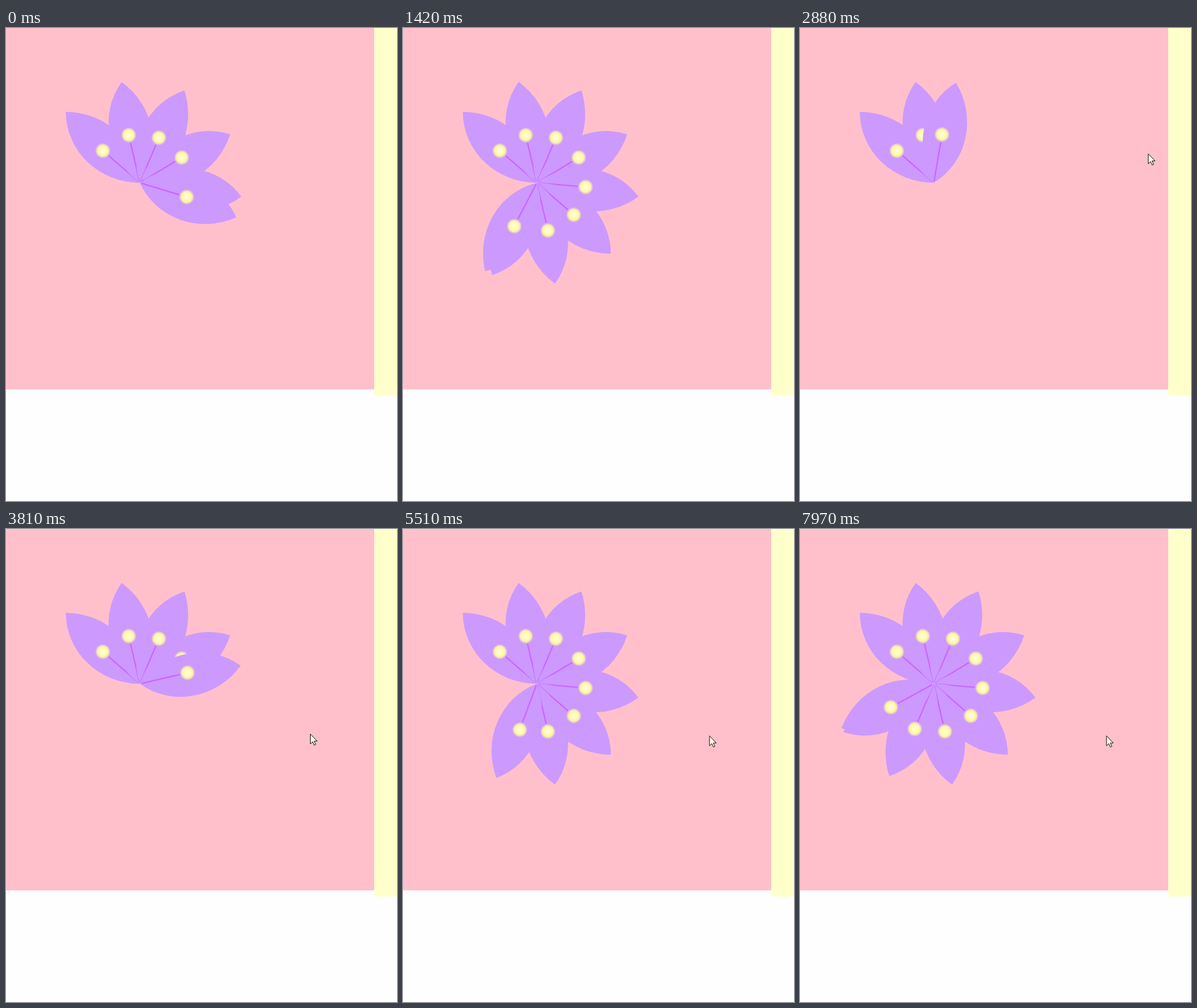
An HTML page with a canvas that plays this animation: 634x767 px, repeating every 8 s.

```html
<!DOCTYPE html>
<html lang="en">
<head>
<meta charset="utf-8">
<title>Blooming flower</title>
<style>
  html, body { margin: 0; width: 100%; height: 100%; overflow: hidden; background: #fefefe; }
  canvas { display: block; }
</style>
</head>
<body>
<canvas id="stage" width="634" height="767"></canvas>
<script>
const ctx = document.getElementById('stage').getContext('2d');
const LOOP = 8000, PETALS = 10, GAP = 36, FULL = GAP * (PETALS - 1);
const RESTART = 27, HOLD = 85;

// The picture advances in steps: [first step, last step, count]
const RUNS = [
  [70, 870, 11], [950, 1730, 11], [1800, 2570, 11], [2650, 3430, 11], [3500, 4270, 11],
  [4360, 5120, 11], [5190, 5960, 11], [6040, 6590, 8], [7590, 7970, 6]
];

// Pointer path: [step, x, y]
const POINTER = [
  [32, 392, 2], [33, 393, 18], [38, 607, 250], [42, 482, 305],
  [44, 490, 327], [49, 493, 332], [56, 496.5, 335]
];

function stepAt(time) {
  let step = 0;
  for (const [first, last, count] of RUNS) {
    if (time < first) break;
    const gap = (last - first) / (count - 1);
    step += Math.min(count, Math.floor((time - first + 5) / gap) + 1);
  }
  return step;
}

function openingAt(step) {
  if (step < RESTART) return 155.9 + 5.59 * step;
  if (step <= HOLD) return Math.min(FULL, 126 + 5.61 * (step - 49));
  return FULL - 5.58 * (step - HOLD);
}

function pointerAt(step) {
  if (step < POINTER[0][0]) return null;
  const i = POINTER.findIndex(p => p[0] > step);
  if (i < 0) return POINTER[POINTER.length - 1].slice(1);
  const [s0, x0, y0] = POINTER[i - 1], [s1, x1, y1] = POINTER[i];
  const k = (step - s0) / (s1 - s0);
  return [x0 + (x1 - x0) * k, y0 + (y1 - y0) * k];
}

const glow = ctx.createRadialGradient(-60, -52, 0, -60, -52, 12.5);
glow.addColorStop(0, '#ffffc8');
glow.addColorStop(0.4, '#fffbbc');
glow.addColorStop(0.68, '#fbf3a8');
glow.addColorStop(0.8, 'rgba(246,236,164,.75)');
glow.addColorStop(1, 'rgba(246,236,164,0)');

// Leaf with its base at the origin and its tip up and to the left
function drawPetal(degrees) {
  ctx.save();
  ctx.translate(217, 251);
  ctx.rotate(degrees * Math.PI / 180);
  ctx.fillStyle = '#cc99ff';
  ctx.beginPath();
  ctx.ellipse(-120, 0, 120, 115, 0, -Math.PI / 2, 0);
  ctx.ellipse(0, -115, 120, 115, 0, Math.PI / 2, Math.PI);
  ctx.fill();
  ctx.strokeStyle = '#cc66ff';
  ctx.lineWidth = 2.2;
  ctx.beginPath();
  ctx.moveTo(-2.3, -2);
  ctx.lineTo(-50.5, -43.8);
  ctx.stroke();
  ctx.fillStyle = glow;
  ctx.fillRect(-73, -65, 26, 26);
  ctx.restore();
}

const arrow = new Path2D('M.5 .5V16.5L4.2 13L6.8 18.6L9.2 17.5L6.7 12H11.6Z');

function drawPointer([x, y]) {
  ctx.save();
  ctx.translate(x, y);
  ctx.fillStyle = '#ffffe4';
  ctx.fill(arrow);
  ctx.strokeStyle = '#111';
  ctx.lineWidth = 1;
  ctx.stroke(arrow);
  ctx.restore();
}

function rect(color, x, y, w, h) {
  ctx.fillStyle = color;
  ctx.fillRect(x, y, w, h);
}

function draw(now) {
  const step = stepAt(now % LOOP), opening = openingAt(step), pointer = pointerAt(step);
  rect('#fefefe', 0, 0, 634, 767);
  rect('#ffc0cb', 0, 0, 597, 586);
  rect('#ffffcc', 597, 0, 37, 596);
  // Petals still travelling share one place, so only the top one is drawn
  for (let i = 0; i < PETALS && i * GAP < opening; i++) drawPetal(i * GAP);
  drawPetal(opening);
  if (pointer) drawPointer(pointer);
}

const start = performance.now();
function tick() {
  draw(performance.now() - start);
  requestAnimationFrame(tick);
}
tick();
</script>
</body>
</html>
```
